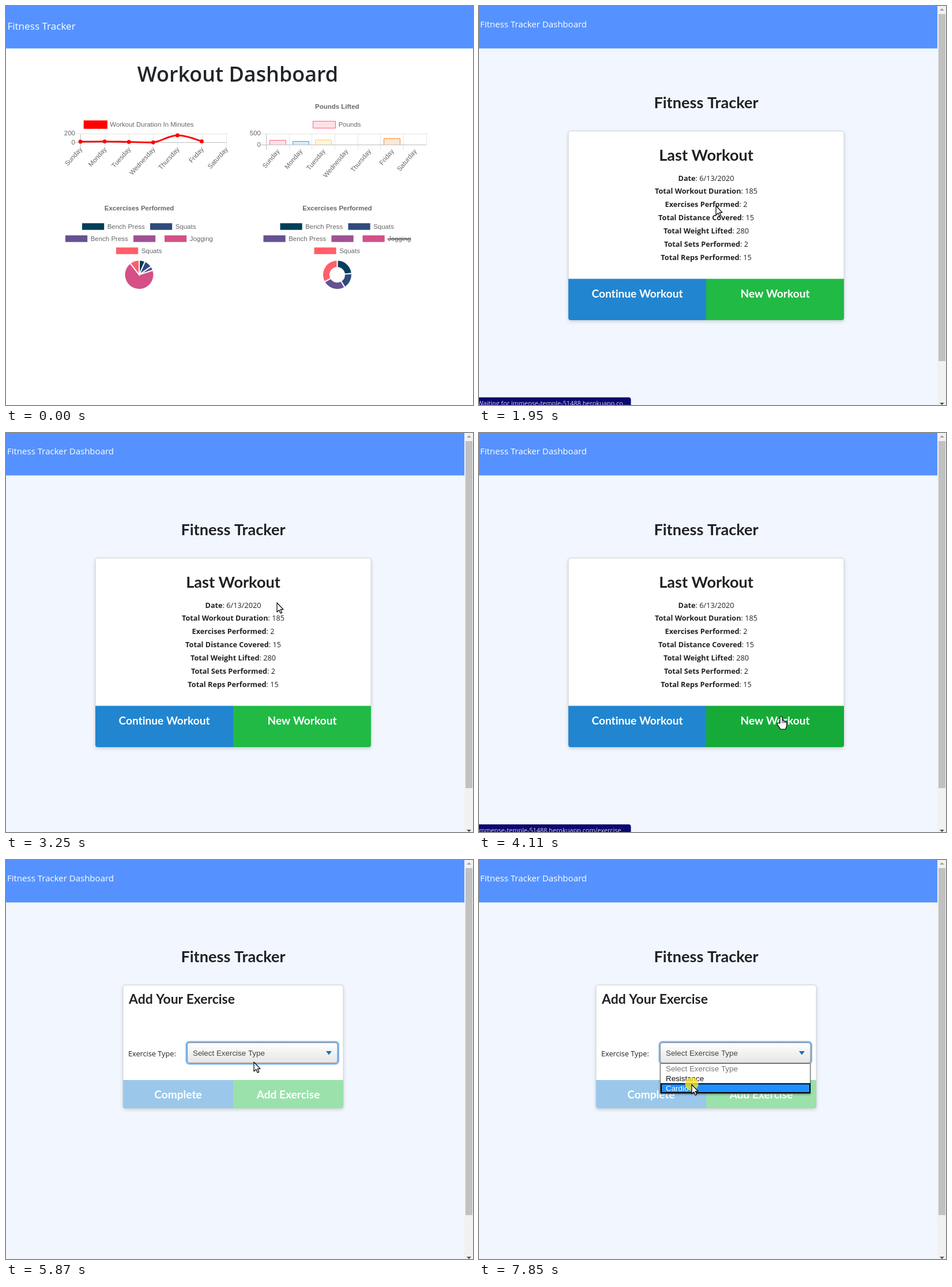
An HTML page with a canvas for the animation above (8000 ms loop, 810 by 691 pixels).

```html
<!DOCTYPE html>
<html lang="en">
<head>
<meta charset="utf-8">
<title>Fitness Tracker</title>
<style>
  html, body { margin: 0; width: 100%; height: 100%; overflow: hidden; background: #fff; }
  canvas { display: block; }
</style>
</head>
<body>
<canvas id="stage" width="810" height="691"></canvas>
<script>
const ctx = document.getElementById('stage').getContext('2d');
ctx.letterSpacing = '0.01px'; // turns optional ligatures off
const LOOP = 8000;
const SANS = '"Open Sans", sans-serif';
const LATO = 'Lato, sans-serif';
const ARIAL = '"Liberation Sans", Arial, sans-serif';
const LABEL = `11.46px ${ARIAL}`;
const OPTION = `13.37px ${ARIAL}`;
const HEADING = `bold 27.1px ${LATO}`;
const BLUE = '#2185d0', GREEN = '#21ba45';
const HOST = 'immense-temple-51488.herokuapp.com';
const WAITING = 'Waiting for immense-temple-51488.herokuapp.co...';
const DAYS = ['Sunday', 'Monday', 'Tuesday', 'Wednesday', 'Thursday', 'Friday', 'Saturday'];

// Pointer: start time, x, y, shape, click highlight
const POINTER = [
  [100, 741, 160, 'arrow'], [290, 560, 130, 'arrow'], [490, 300, 85, 'arrow'],
  [680, 80, 38, 'hand'], [870, 62, 28, 'hand', true], [1070, 62, 28, 'hand'],
  [1290, 230, 180, 'arrow'], [1520, 411, 346, 'arrow'],
  [2170, 425, 385, 'arrow'], [2390, 465, 440, 'arrow'], [2600, 500, 480, 'arrow'],
  [2820, 514, 492, 'arrow'], [3030, 490, 400, 'arrow'], [3250, 470, 294, 'arrow'],
  [3470, 490, 370, 'arrow'], [3690, 515, 450, 'arrow'], [3900, 522, 485, 'hand'],
  [4110, 524, 491, 'hand'], [4330, 524, 491, 'hand', true], [4570, 524, 491, 'hand'],
  [5430, 510, 470, 'arrow'], [5650, 470, 400, 'arrow'], [5870, 430, 350, 'arrow'],
  [6100, 413, 334, 'arrow'], [6740, 413, 334, 'arrow', true], [6960, 408, 345, 'arrow'],
  [7180, 392, 362, 'arrow'], [7410, 378, 374, 'arrow'],
  [7620, 369, 389, 'arrow'], [7850, 369, 389, 'arrow', true]
];

// Status bar: start time, text, opacity
const STATUS = [
  [680, HOST, 1], [1290, WAITING, 1], [2820, WAITING, .8], [3030, '', 0],
  [3900, HOST + '/exercise', 1], [4570, WAITING, 1],
  [5650, '', 0], [6320, WAITING, 1], [6960, '', 0]
];

const SHAPES = {
  arrow: new Path2D('M0 0V16L3.7 12.6L6.2 18.2L8.7 17.1L6.2 11.6H11Z'),
  hand: new Path2D('M-2 12V1.5Q-2 0 0 0T2 1.5V7Q3.6 6 5 8Q6.6 7 7.5 9Q9.8 8.6 9.8 11V15Q9.5 18 7.5 22H-1L-6 14.5Q-7.5 11.5 -5 11Z')
};

const current = (track, t) => track.filter(step => step[0] <= t).pop();

function text(str, x, y, font, color = '#666', align = 'left') {
  ctx.font = font;
  ctx.fillStyle = color;
  ctx.textAlign = align;
  ctx.fillText(str, x, y);
}

function rect(x, y, w, h, fill) {
  ctx.fillStyle = fill;
  ctx.fillRect(x, y, w, h);
}

function line(x1, y1, x2, y2, color = '#e5e5e5', width = 1) {
  ctx.strokeStyle = color;
  ctx.lineWidth = width;
  ctx.beginPath();
  ctx.moveTo(x1, y1);
  ctx.lineTo(x2, y2);
  ctx.stroke();
}

function polygon(points, fill) {
  ctx.fillStyle = fill;
  ctx.beginPath();
  points.forEach(([x, y]) => ctx.lineTo(x, y));
  ctx.fill();
}

function roundBox(x, y, w, h, r, fill, stroke, width = 1) {
  ctx.beginPath();
  ctx.roundRect(x, y, w, h, r);
  if (fill) { ctx.fillStyle = fill; ctx.fill(); }
  if (stroke) { ctx.strokeStyle = stroke; ctx.lineWidth = width; ctx.stroke(); }
}

function dayLabel(day, x, y, angle) {
  ctx.save();
  ctx.translate(x, y);
  ctx.rotate(-angle * Math.PI / 180);
  text(day, 0, 4, LABEL, '#666', 'right');
  ctx.restore();
}

function durationChart() {
  const dayX = i => 129 + i * 42.1;
  rect(134.7, 198.2, 41.2, 14.5, '#f00');
  text('Workout Duration In Minutes', 180.3, 209, LABEL);
  text('200', 120, 224, LABEL, '#666', 'right');
  text('0', 120, 240, LABEL, '#666', 'right');
  DAYS.forEach((day, i) => {
    const x = Math.round(dayX(i)) + .5;
    line(x, 221, x, 244, i ? '#e5e5e5' : '#bfbfbf');
    dayLabel(day, dayX(i) + 1, 246, 48);
  });
  line(120, 221.5, 382, 221.5);
  line(120, 236.5, 382, 236.5, '#bfbfbf');

  const points = [235, 234.6, 235.4, 236.2, 224, 234.4].map((y, i) => [dayX(i), y]);
  const tangent = i => {
    const a = points[Math.max(i - 1, 0)], b = points[Math.min(i + 1, 5)];
    return [(b[0] - a[0]) * .2, (b[1] - a[1]) * .2];
  };
  ctx.strokeStyle = '#f00';
  ctx.lineWidth = 2.9;
  ctx.beginPath();
  ctx.moveTo(...points[0]);
  for (let i = 0; i < 5; i++) {
    const [p, q] = [points[i], points[i + 1]], [m, n] = [tangent(i), tangent(i + 1)];
    ctx.bezierCurveTo(p[0] + m[0], p[1] + m[1], q[0] - n[0], Math.min(q[1] - n[1], 236.5), ...q);
  }
  ctx.stroke();
  ctx.fillStyle = '#f00';
  points.forEach(([x, y]) => {
    ctx.beginPath();
    ctx.arc(x, y, 3.4, 0, 7);
    ctx.fill();
  });
}

function poundsChart() {
  const step = 39.65;
  text('Pounds Lifted', 574.3, 178, `bold ${LABEL}`, '#666', 'center');
  roundBox(532.5, 199.5, 39, 12, 0, '#ffe0e6', '#ff6384');
  text('Pounds', 576.7, 209, LABEL);
  text('500', 442, 224, LABEL, '#666', 'right');
  text('0', 442, 243.5, LABEL, '#666', 'right');
  for (let i = 0; i < 8; i++) {
    const x = Math.round(451 + i * step) + .5;
    line(x, 221, x, i < 7 ? 249 : 240, i ? '#e5e5e5' : '#bfbfbf');
  }
  line(442, 221.5, 729, 221.5);
  line(442, 240.5, 729, 240.5, '#bfbfbf');
  DAYS.forEach((day, i) => dayLabel(day, 472 + i * step, 249.3, 50));
  [[0, 232.5, '255,99,132'], [1, 234.5, '54,162,235'], [2, 232, '255,206,86'], [5, 229.5, '240,140,50']]
    .forEach(([i, y, rgb]) => {
      const x = Math.round(457 + i * step) + .5;
      rect(x, y, 28, 240 - y, `rgba(${rgb},.2)`);
      ctx.strokeStyle = `rgb(${rgb})`;
      ctx.beginPath();
      ctx.moveTo(x, 240);
      ctx.lineTo(x, y);
      ctx.lineTo(x + 28, y);
      ctx.lineTo(x + 28, 240);
      ctx.stroke();
    });
}

function exerciseChart(cx, ends, hole, struck) {
  const colors = ['#003f5c', '#2f4b7c', '#665191', '#a05195', '#d45087', '#ff5f69'];
  const legend = [
    ['Bench Press', -99, 382], ['Squats', 19, 382], ['Bench Press', -128, 403],
    ['', -10, 403], ['Jogging', 44, 403], ['Squats', -40, 424]
  ];
  text('Excercises Performed', cx, 354, `bold ${LABEL}`, '#666', 'center');
  legend.forEach(([name, dx, y], i) => {
    rect(cx + dx, y - 5.8, 38.2, 11.5, colors[i]);
    text(name, cx + dx + 43.7, y + 4, LABEL);
  });
  if (struck) line(cx + 87, 403.5, cx + 128, 403.5, '#666', 1.9);

  const rad = deg => (deg - 90) * Math.PI / 180;
  ends.forEach((end, i) => {
    const start = ends[i - 1] || 0;
    if (end === start) return;
    ctx.beginPath();
    ctx.arc(cx, 465.5, 25.4, rad(start), rad(end));
    ctx.arc(cx, 465.5, hole, rad(end), rad(start), true);
    ctx.closePath();
    ctx.fillStyle = colors[i];
    ctx.fill();
    ctx.strokeStyle = '#fff';
    ctx.lineWidth = 1.9;
    ctx.stroke();
  });
}

function dashboard() {
  rect(0, 0, 810, 691, '#fff');
  rect(0, 0, 810, 73.5, '#5592ff');
  text('Fitness Tracker', 2.4, 41, `17.1px ${SANS}`, '#fff');
  text('Workout Dashboard', 402, 130.6, `600 35.9px ${SANS}`, '#212529', 'center');
  durationChart();
  poundsChart();
  exerciseChart(231, [24, 55, 72, 72, 322, 360], 0, false);
  exerciseChart(574.5, [85, 149, 241, 241, 241, 360], 12.6, true);
}

function trackerPage() {
  rect(0, 0, 810, 691, '#f2f7ff');
  rect(0, 0, 795, 73.5, '#5592ff');
  text('Fitness Tracker Dashboard', 2, 37, `15px ${SANS}`, '#fff');
  text('Fitness Tracker', 394, 177, HEADING, '#1f2124', 'center');
  rect(795, 0, 15, 691, '#f1f1f1');
  rect(797, 14, 12, 601, '#c1c1c1');
  polygon([[799, 8], [803, 4], [807, 8]], '#a3a3a3');
  polygon([[799, 687], [807, 687], [803, 691]], '#505050');
}

function card(x, w, bottom, split, buttons) {
  ctx.save();
  ctx.shadowColor = 'rgba(34,36,38,.22)';
  ctx.shadowBlur = 6;
  ctx.shadowOffsetY = 2;
  roundBox(x, 217, w, bottom - 217, 4, '#fff');
  ctx.restore();
  roundBox(x, 216.5, w, bottom - 216.5, 4, null, '#d4d4d5');
  buttons.forEach(([label, color, baseline], i) => {
    roundBox(x + i * w / 2, split, w / 2, bottom - split, i ? [0, 0, 4, 0] : [0, 0, 0, 4], color);
    text(label, x + w * (.25 + i / 2), baseline, `bold 19.1px ${LATO}`, '#fff', 'center');
  });
}

function lastWorkout(hover) {
  card(155, 478, 544, 472.5, [
    ['Continue Workout', BLUE, 504.5],
    ['New Workout', hover ? '#16ab39' : GREEN, 504.5]
  ]);
  text('Last Workout', 394, 268, HEADING, '#1f2124', 'center');
  const regular = `12.7px ${SANS}`, bold = `bold ${regular}`;
  const stats = [
    ['Date', '6/13/2020'], ['Total Workout Duration', 185], ['Exercises Performed', 2],
    ['Total Distance Covered', 15], ['Total Weight Lifted', 280],
    ['Total Sets Performed', 2], ['Total Reps Performed', 15]
  ];
  stats.forEach(([name, value], i) => {
    const y = 302.5 + i * 22.9, rest = `: ${value}`;
    ctx.font = bold;
    const nameWidth = ctx.measureText(name).width;
    ctx.font = regular;
    const x = 394 - (nameWidth + ctx.measureText(rest).width) / 2;
    text(name, x, y, bold, '#222');
    text(rest, x + nameWidth, y, regular, '#222');
  });
}

function addExercise(t) {
  card(203, 382, 430, 381, [['Complete', '#9bc8ea', 413], ['Add Exercise', '#9be1ab', 413]]);
  text('Add Your Exercise', 213, 249, `bold 22.9px ${LATO}`, '#1f2124');
  text('Exercise Type:', 212, 340, `12.7px ${SANS}`, '#222');

  const focused = t >= 6740 || (t >= 5870 && t < 6320);
  if (focused) roundBox(313, 315, 263.5, 38, 5, null, '#7db6f0', 3);
  const shade = ctx.createLinearGradient(0, 316, 0, 352);
  shade.addColorStop(0, '#fff');
  shade.addColorStop(1, '#e5e5e5');
  roundBox(314.5, 316.5, 260.5, 35, 4.5, shade, t >= 5870 ? '#888' : '#aaa');
  text('Select Exercise Type', 324, 339, OPTION, focused ? '#444' : '#222');
  polygon([[555, 331], [565, 331], [560, 337.5]], '#0f72b5');
  if (t < 6960) return;

  const active = t < 7180 ? 0 : t < 7620 ? 1 : 2;
  ctx.save();
  ctx.shadowColor = 'rgba(0,0,0,.35)';
  ctx.shadowBlur = 3;
  ctx.shadowOffsetY = 1;
  rect(314, 352, 261, 53, '#fff');
  ctx.restore();
  roundBox(314.5, 352.5, 260, 52, 0, null, '#666');
  if (active) roundBox(316, 353 + active * 17.3, 258, 15.5, 0, '#1e90ff', '#000', 2);
  ['Select Exercise Type', 'Resistance', 'Cardio'].forEach((name, i) =>
    text(name, 324, 366 + i * 17.1, OPTION, !i ? '#777' : i === active ? '#fff' : '#111'));
}

function statusBar(t) {
  const [, label, opacity] = current(STATUS, t) || [0, '', 0];
  if (!opacity) return;
  ctx.globalAlpha = opacity;
  roundBox(-5, 677.7, 268.5, 20, 4, '#0b0870');
  text(label, -2.5, 691.5, `10.88px ${SANS}`, '#d3d6ec');
  ctx.globalAlpha = 1;
}

function pointer(t) {
  const step = current(POINTER, t);
  if (!step) return;
  const [, x, y, shape, click] = step;
  if (click) {
    ctx.fillStyle = 'rgba(250,230,40,.78)';
    ctx.beginPath();
    ctx.arc(x, y - 1, 11.5, 0, 7);
    ctx.fill();
  }
  ctx.save();
  ctx.translate(x, y);
  ctx.lineJoin = 'round';
  ctx.lineWidth = 1.2;
  ctx.fillStyle = '#fff';
  ctx.strokeStyle = '#000';
  ctx.fill(SHAPES[shape]);
  ctx.stroke(SHAPES[shape]);
  if (shape === 'hand') {
    for (const dx of [2, 5, 7.5]) line(dx, 8, dx, 11.5, '#000');
  }
  ctx.restore();
}

function frame() {
  const t = performance.now() % LOOP;
  if (t < 1950) {
    dashboard();
  } else {
    trackerPage();
    if (t < 5000) lastWorkout(t >= 3900);
    else addExercise(t);
  }
  statusBar(t);
  pointer(t);
  requestAnimationFrame(frame);
}
frame();
</script>
</body>
</html>
```
